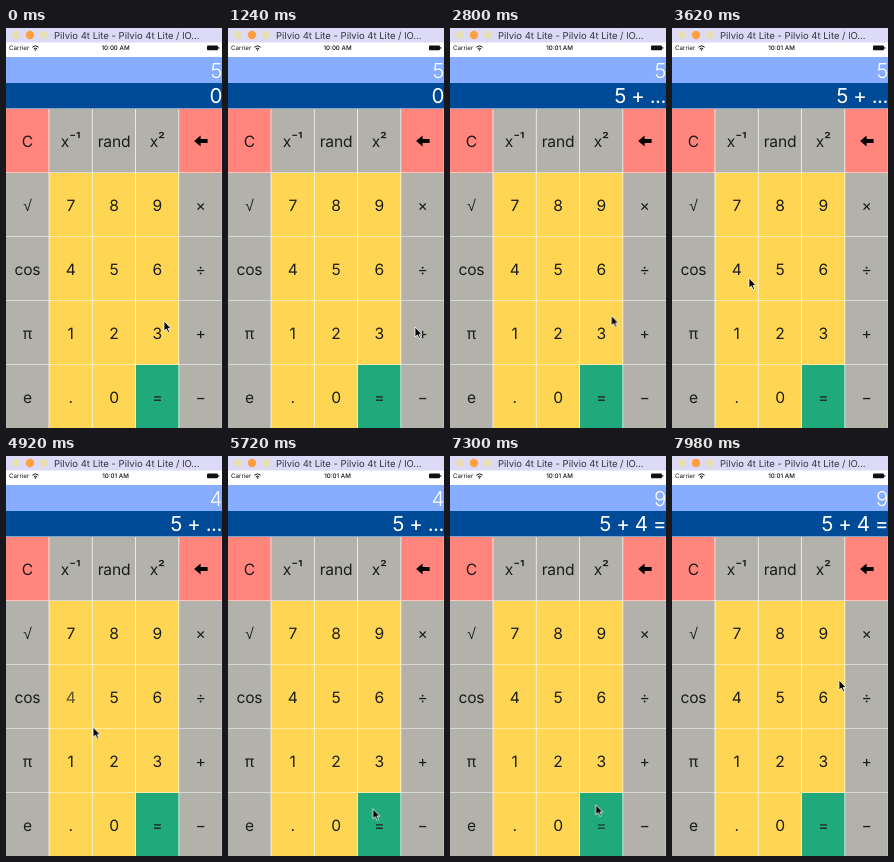
Write an HTML page that moves like this. It is 216 by 400 pixels and loops after 8000 ms.

```html
<!DOCTYPE html>
<html lang="en">
<head>
<meta charset="utf-8">
<title>Calculator</title>
<style>
html, body { margin: 0; width: 100%; height: 100%; overflow: hidden; background: #fff; }
svg { display: block; width: 100vw; height: 100vh; }
text { font-family: Inter, Roboto, sans-serif; fill: #1c1c1a; text-rendering: geometricPrecision; }
.title { font-size: 9.5px; fill: #34343c; }
.status { font-size: 6.2px; fill: #111; }
.clock { font-weight: 500; text-anchor: middle; }
.display { font-size: 20.5px; font-weight: 400; fill: #fff; text-anchor: end; white-space: pre; letter-spacing: -.45px; }
.result { font-weight: 300; }
.key { font-size: 15.6px; font-weight: 400; text-anchor: middle; letter-spacing: -.2px; }
.root { font-family: "Liberation Sans", sans-serif; }

/* Every animation shares the 8 s loop */
.swap, .key, #cursor { animation: 8s linear infinite; }
.swap { opacity: 0; animation-timing-function: step-end; }
.early { animation-name: early; }
.late { animation-name: late; }
.five { animation-name: five; }
.four { animation-name: four; }
.nine { animation-name: nine; }
.zero { animation-name: zero; }
.pending { animation-name: pending; }
@keyframes early { 0% { opacity: 1 } 35% { opacity: 0 } }
@keyframes late { 0% { opacity: 0 } 35% { opacity: 1 } }
@keyframes five { 0% { opacity: 1 } 57.75% { opacity: 0 } }
@keyframes four { 0% { opacity: 0 } 57.75% { opacity: 1 } 86.9% { opacity: 0 } }
@keyframes nine { 0% { opacity: 0 } 86.9% { opacity: 1 } }
@keyframes zero { 0% { opacity: 1 } 21.25% { opacity: 0 } }
@keyframes pending { 0% { opacity: 0 } 21.25% { opacity: 1 } 86.9% { opacity: 0 } }

.tap-plus { animation-name: tapPlus; }
.tap-4 { animation-name: tapFour; }
.tap-equals { animation-name: tapEquals; }
@keyframes tapPlus { 0%, 20% { opacity: 1 } 20.05%, 21.25% { opacity: .2 } 27.2%, 100% { opacity: 1 } }
@keyframes tapFour { 0%, 56.5% { opacity: 1 } 56.55%, 57.75% { opacity: .2 } 63.7%, 100% { opacity: 1 } }
@keyframes tapEquals { 0%, 85.6% { opacity: 1 } 85.65%, 86.9% { opacity: .2 } 92.8%, 100% { opacity: 1 } }

#cursor { animation-name: point; }
@keyframes point {
  0% { transform: translate(158px, 293px); animation-timing-function: ease-out }
  8%, 31% { transform: translate(187px, 299px); animation-timing-function: ease-in-out }
  43%, 58.5% { transform: translate(77px, 250px); animation-timing-function: ease-in }
  61.5% { transform: translate(87px, 271px); animation-timing-function: ease-out }
  72%, 90% { transform: translate(145px, 353px); animation-timing-function: ease-in-out }
  99.75%, 100% { transform: translate(167px, 224px) }
}
</style>
</head>
<body>
<svg viewBox="0 0 216 400" preserveAspectRatio="none">
  <rect width="216" height="400" fill="#fff"/>
  <rect width="216" height="14.5" fill="#dcdaf6"/>
  <circle cx="10" cy="7" r="4" fill="#e6dfb4"/>
  <circle cx="24" cy="7" r="4.2" fill="#ffa03c"/>
  <circle cx="38" cy="7" r="4" fill="#e6dfb4"/>
  <text class="title" x="48" y="10.5">Pilvio 4t Lite - Pilvio 4t Lite / lO...</text>

  <text class="status" x="3" y="22.3">Carrier</text>
  <path d="M26.4 19.2Q29.5 16.4 32.6 19.2M27.8 20.9Q29.5 19.4 31.2 20.9" fill="none" stroke="#111"/>
  <circle cx="29.5" cy="22" r=".8" fill="#111"/>
  <text class="status clock swap early" x="109.5" y="22.3">10:00 AM</text>
  <text class="status clock swap late" x="109.5" y="22.3">10:01 AM</text>
  <rect x="201" y="17.5" width="11" height="4.8" rx="1" fill="#111"/>
  <rect x="212.3" y="19" width="1" height="1.8" fill="#111"/>

  <rect y="29" width="216" height="26" fill="#86adff"/>
  <rect y="55" width="216" height="25.5" fill="#004b98"/>
  <text class="display result swap five" x="216" y="49.5">5</text>
  <text class="display result swap four" x="216" y="49.5">4</text>
  <text class="display result swap nine" x="216" y="49.5">9</text>
  <text class="display swap zero" x="216" y="75.2">0</text>
  <text class="display swap pending" x="216" y="75.2">5 + ...</text>
  <text class="display swap nine" x="216" y="75.2">5 + 4 =</text>

  <g id="keys"></g>
  <path id="cursor" d="M0 0V10L2.4 8L4 11.6L5.6 10.9L4.1 7.4H7Z" fill="#000" stroke="#fff" stroke-width=".8"/>
</svg>
<script>
const rows = [
  ["C", "x⁻¹", "rand", "x²", "⬅"],
  ["√", "7", "8", "9", "×"],
  ["cos", "4", "5", "6", "÷"],
  ["π", "1", "2", "3", "+"],
  ["e", ".", "0", "=", "−"]
];
const extraClass = { "+": "tap-plus", "4": "tap-4", "=": "tap-equals", "√": "root" };
const keys = document.getElementById("keys");

function add(parent, tag, attributes, label = "") {
  const node = document.createElementNS("http://www.w3.org/2000/svg", tag);
  for (const name in attributes) node.setAttribute(name, attributes[name]);
  node.textContent = label;
  return parent.appendChild(node);
}

function keyColor(label) {
  if (label === "C" || label === "⬅") return "#ff857d";
  if (label === "=") return "#20aa7c";
  return /^[\d.]$/.test(label) ? "#ffd653" : "#b2b2aa";
}

function addLabel(label, x, y) {
  const [, base, power] = label.match(/^(.*?)([⁻¹²]*)$/);
  const text = add(keys, "text", { class: "key " + (extraClass[label] || ""), x, y }, base);
  if (power) add(text, "tspan", { dy: -2, "font-weight": 500 }, power);
}

rows.forEach((row, r) => row.forEach((label, c) => {
  const x = c * 43.3, y = 81 + r * 64;
  const cx = x + 21.4, cy = y + 32;
  add(keys, "rect", { x, y, width: 42.6, height: 63.5, fill: keyColor(label) });
  if (label === "⬅") {
    add(keys, "path", { d: `M${cx - 6.5} ${cy}l6.5-5.5v3.5h7v4h-7v3.5z`, fill: "#000" });
  } else {
    addLabel(label, cx, cy + 5.5);
  }
}));
</script>
</body>
</html>
```
